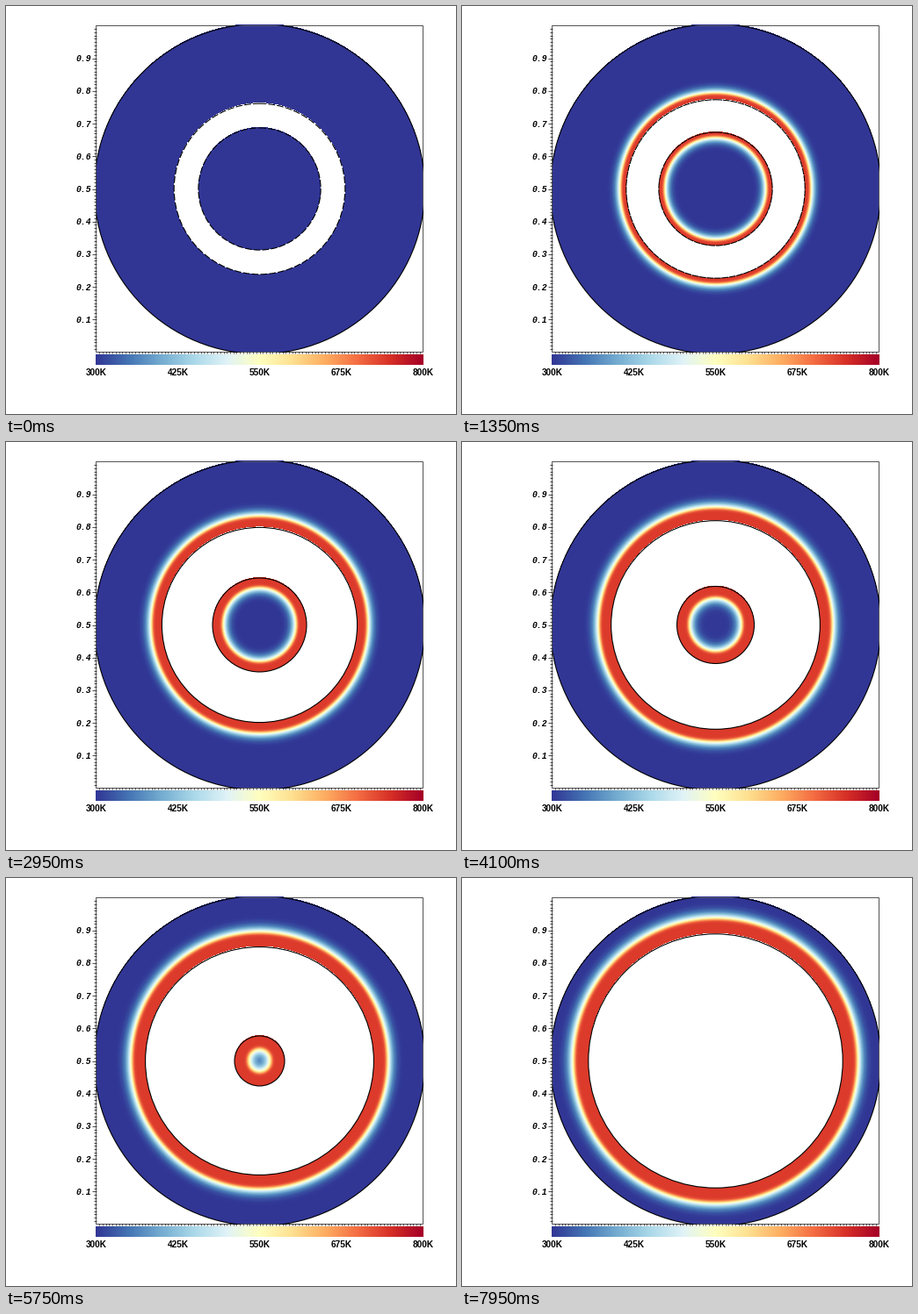
Recreate the animation shown at these times as a matplotlib script. Size 512x465 px, loop 8000 ms.

```python
import numpy as np
import matplotlib.pyplot as plt
from matplotlib.animation import FuncAnimation
from matplotlib.patches import Circle, Rectangle

W, H, DPI = 512, 465, 100
PX = 72 / DPI                       # one pixel in points
LEFT, TOP, SIDE = 102.5, 22.5, 372
RIGHT, BOTTOM = LEFT + SIDE, TOP + SIDE
CX, CY = LEFT + SIDE / 2, TOP + SIDE / 2
DISC_R, GAP_OUT, GAP_IN = 188, 97.3, 69.6
COLD, SPAN = 300, 440

# Burnt depth (px) of both surfaces over time (ms)
OUT_T = [0, 350, 800, 1350, 2950, 7950]
OUT_D = [0, 0.2, 1.5, 4.4, 13.8, 47.4]
IN_T = [0, 350, 800, 1350, 2950, 4100, 5750, 6400, 6800, 7000, 7200]
IN_D = [0, 0.2, 1.6, 5, 16.1, 25.6, 41.1, 49.7, 56, 60.5, 69.6]

# Heat profile across the front, as a share of the surface heat
FRONT_X = [-6, -4, -2.5, 0, 2, 4, 6.5, 10, 14, 18]
FRONT_F = [1, 0.97, 0.86, 0.57, 0.40, 0.26, 0.14, 0.05, 0.01, 0]

fig = plt.figure(figsize=(W / DPI, H / DPI), dpi=DPI, facecolor="white")
ax = fig.add_axes([0, 0, 1, 1])
ax.axis("off")

cmap = plt.get_cmap("RdYlBu_r").copy()
cmap.set_bad("white")

grid = np.arange(SIDE + 1) - SIDE / 2
radius = np.hypot(*np.meshgrid(grid, grid))


def heat(depth, t):
    """Share of surface heat at a depth below the burning surface."""
    if t < 100:
        return np.zeros_like(depth)
    reach = 18.5 * (1 - np.exp(-(t - 70) / 2500))
    scale = 0.75 + 0.42 * (1 - np.exp(-t / 4000))
    ramp = min(1, (t - 50) / 400) ** 0.5
    return ramp * np.interp((depth - reach) / scale, FRONT_X, FRONT_F)


def core_temp(r, r_in, t):
    """Temperature in the core, which warms through as it shrinks."""
    centre = np.interp(r_in, [0, 13.7, 20, 28.5, 45], [560, 575, 470, 355, COLD])
    edge = np.interp(r_in, [0, 13.7, 20], [590, 625, COLD + SPAN])
    if r_in < 14:
        return centre + (edge - centre) * r / r_in
    return centre + (edge - centre) * heat(r_in - r, t)


def field(r_in, r_out, t):
    temp = np.full(radius.shape, np.nan)
    shell = (radius >= r_out) & (radius <= DISC_R)
    core = radius <= r_in
    temp[shell] = COLD + SPAN * heat(radius[shell] - r_out, t)
    if r_in > 0.5:
        temp[core] = core_temp(radius[core], r_in, t)
    return np.ma.masked_invalid(temp)


def line(x, y, width=0.8):
    ax.plot(x, y, color="#222222", lw=width * PX, solid_capstyle="butt")


def ring(r):
    c = Circle((CX, CY), r, fill=False, ec="black", lw=1.1 * PX)
    ax.add_patch(c)
    return c


def label(x, y, text, ha, **font):
    ax.text(x, y, text, ha=ha, va="center_baseline", weight="bold", **font)


img = ax.imshow(field(GAP_IN, GAP_OUT, 0), cmap=cmap, vmin=300, vmax=800,
                extent=(LEFT - 0.5, RIGHT + 0.5, BOTTOM + 0.5, TOP - 0.5),
                interpolation="nearest", aspect="auto")
ax.add_patch(Rectangle((LEFT, TOP), SIDE, SIDE, fill=False, ec="#555555",
                       lw=PX, snap=False))

rim = ring(DISC_R)
rim.set_clip_path(Rectangle((LEFT, TOP), SIDE, SIDE, transform=ax.transData))
outer, inner = ring(GAP_OUT), ring(GAP_IN)

# Ticks along the left and bottom edges
for k in range(1, 100):
    step = k * SIDE / 100
    y = BOTTOM - step
    line([LEFT - (5 if k % 10 == 0 else 2.5), LEFT], [y, y])
    line([LEFT + step] * 2, [BOTTOM - 0.5, BOTTOM + 1.5])
for k in range(1, 10):
    label(97, BOTTOM - k * SIDE / 10 - 0.6, f"0.{k}", "right",
          fontsize=9.8 * PX, family="Liberation Mono", style="italic")

# Colour bar
ax.imshow(np.linspace(0, 1, 256)[None, :], cmap=cmap, aspect="auto",
          extent=(LEFT - 0.5, RIGHT + 0.5, 409, 397), interpolation="nearest")
for k in range(5):
    label(LEFT + k * SIDE / 4, 416.5, f"{300 + 125 * k}K", "center",
          fontsize=10 * PX, family="Liberation Sans")

ax.set_xlim(0, W)
ax.set_ylim(H, 0)


def update(i):
    t = 50 * i
    r_out = GAP_OUT + np.interp(t, OUT_T, OUT_D)
    r_in = GAP_IN - np.interp(t, IN_T, IN_D)
    img.set_data(field(r_in, r_out, t))
    outer.set_radius(r_out)
    inner.set_radius(max(r_in, 0))
    inner.set_visible(r_in > 0.5)
    # the broken outline closes up as burning goes on
    gap = np.interp(t, [0, 1350, 1800], [2, 0.7, 0])
    style = (0, (7, gap)) if gap > 0 else "-"
    outer.set_linestyle(style)
    inner.set_linestyle(style)
    return img, outer, inner


anim = FuncAnimation(fig, update, frames=160, interval=50, repeat=True,
                     repeat_delay=0, blit=False)
plt.show()
```
